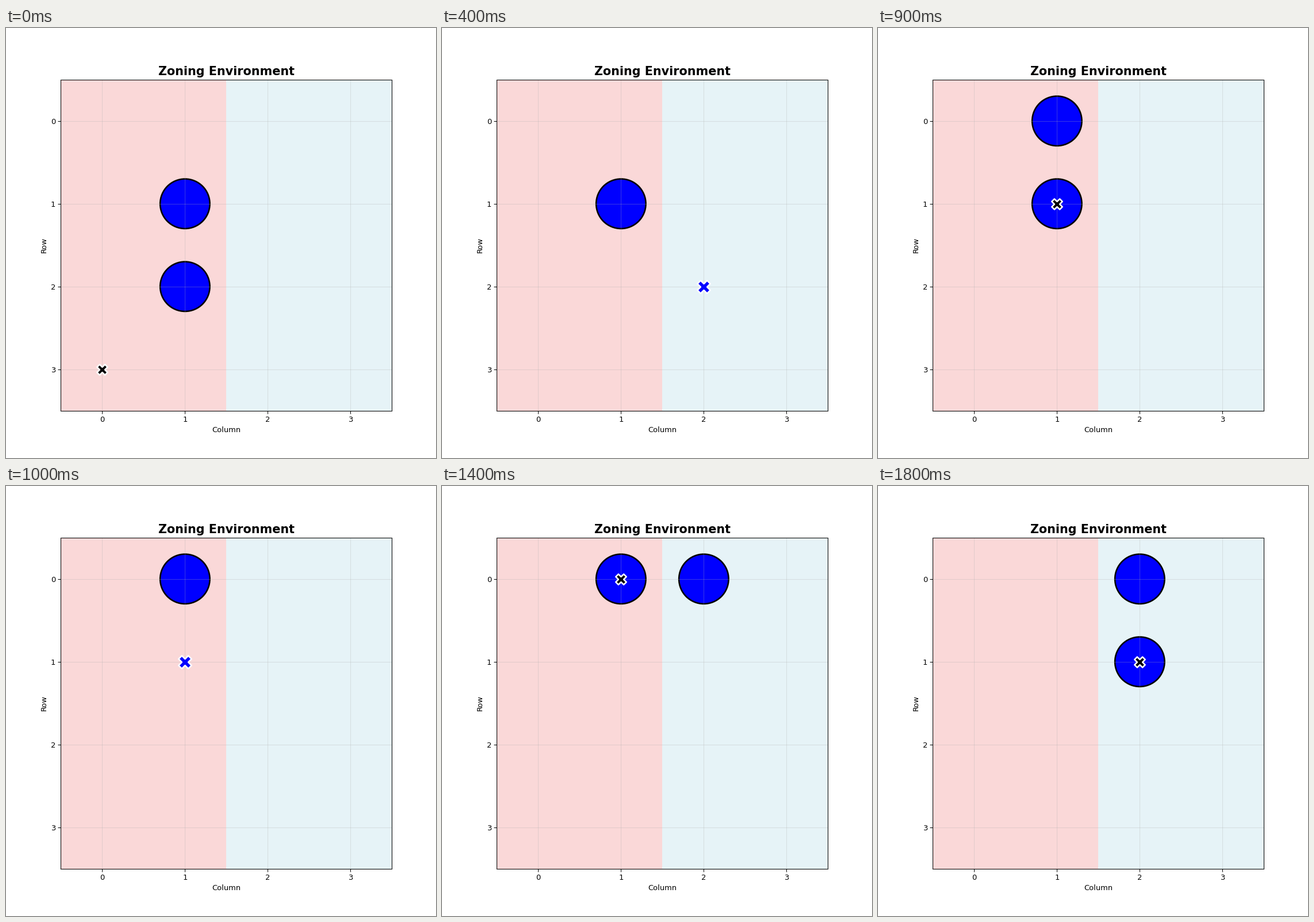
A matplotlib script that plays this animation: 748 by 748 pixels, repeating every 1900 ms.

```python
import matplotlib.pyplot as plt
from matplotlib.animation import FuncAnimation
from matplotlib.patches import Circle, Rectangle

SIZE, INCHES = 748, 8
GRID = 4
START = (0, 3)
BALLS = [(1, 1), (1, 2)]
# One action per step: R/L/U/D move the agent, P picks up, S sets down.
PLAN = "RUPRUULSDPRUSLPDRS"
MOVES = {"R": (1, 0), "L": (-1, 0), "U": (0, -1), "D": (0, 1)}


def simulate():
    """Return (agent, carrying, balls) for every step of the plan."""
    agent, carrying, balls = START, False, set(BALLS)
    states = [(agent, carrying, sorted(balls))]
    for action in PLAN:
        if action == "P":
            balls.remove(agent)
            carrying = True
        elif action == "S":
            balls.add(agent)
            carrying = False
        else:
            dx, dy = MOVES[action]
            agent = (agent[0] + dx, agent[1] + dy)
        states.append((agent, carrying, sorted(balls)))
    return states


STATES = simulate()

plt.rcParams["font.family"] = "DejaVu Sans"
fig, ax = plt.subplots(figsize=(INCHES, INCHES), dpi=SIZE / INCHES)
ax.set_aspect("equal")
ax.set_xlim(-0.5, GRID - 0.5)
ax.set_ylim(GRID - 0.5, -0.5)
ax.set_xticks(range(GRID))
ax.set_yticks(range(GRID))
ax.set_xlabel("Column")
ax.set_ylabel("Row")
ax.set_title("Zoning Environment", fontsize=16, fontweight="bold")
ax.grid(True, alpha=0.3)

for left, color in ((-0.5, "lightcoral"), (1.5, "lightblue")):
    ax.add_patch(Rectangle((left, -0.5), 2, GRID, facecolor=color,
                           alpha=0.3, linewidth=0, zorder=0))

discs = [ax.add_patch(Circle(pos, 0.3, facecolor="blue", edgecolor="black",
                             linewidth=2, zorder=1)) for pos in BALLS]
cross = ax.scatter(*START, s=200, marker="X", c="black",
                   edgecolors="white", linewidths=2, zorder=5)


def update(step):
    agent, carrying, balls = STATES[step]
    for i, disc in enumerate(discs):
        disc.set_visible(i < len(balls))
        if i < len(balls):
            disc.center = balls[i]
    cross.set_offsets([agent])
    cross.set_facecolor("blue" if carrying else "black")
    cross.set_sizes([300 if carrying else 200])
    return [*discs, cross]


anim = FuncAnimation(fig, update, frames=len(STATES), interval=100,
                     repeat=True, repeat_delay=0, blit=False)
plt.show()
```
